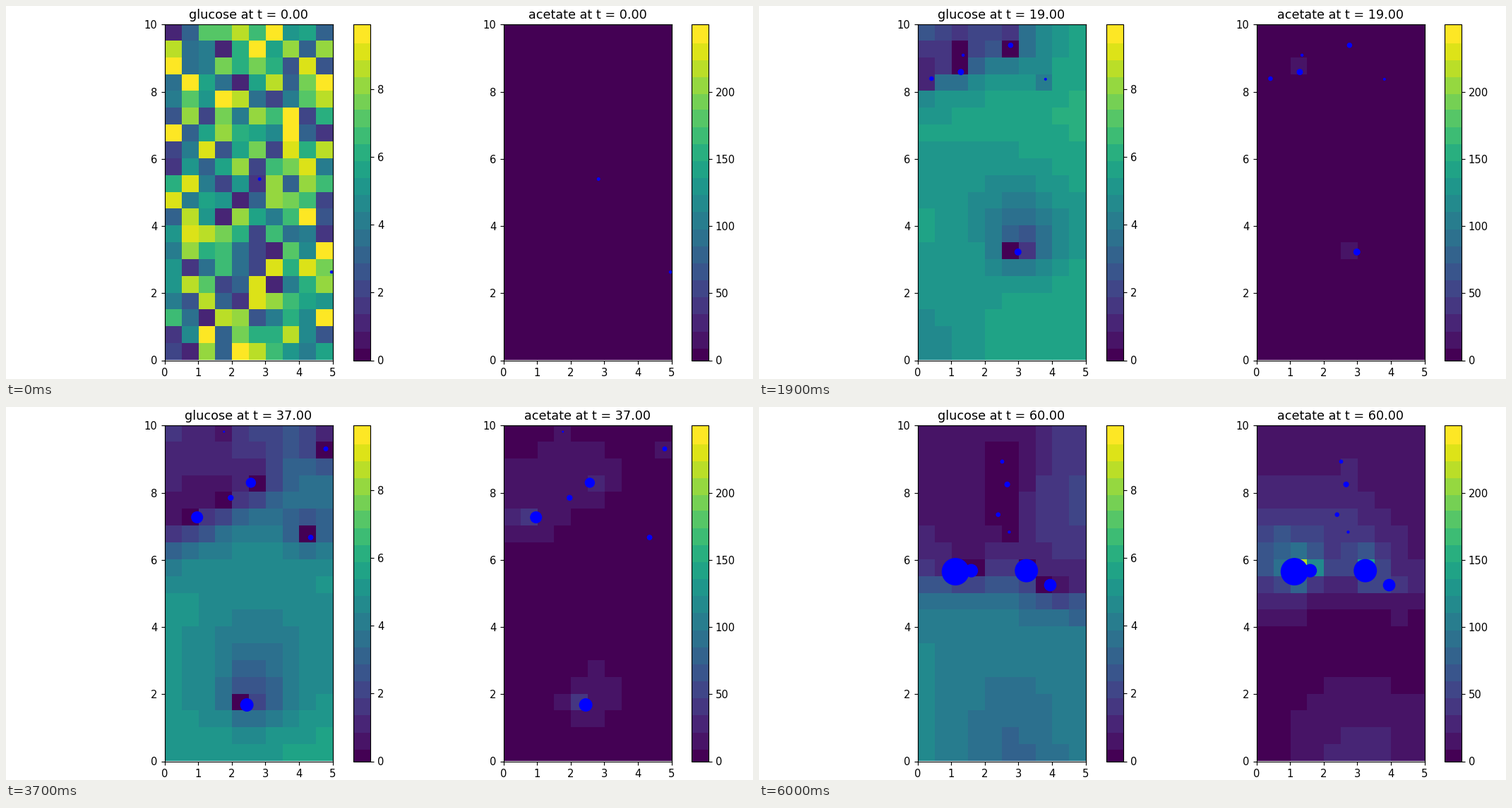
Write a matplotlib script that moves like this. It is 1058 by 529 pixels and loops after 6.1 s.

```python
import numpy as np
import matplotlib.pyplot as plt
from matplotlib.animation import FuncAnimation
from matplotlib.colors import ListedColormap

WIDTH, HEIGHT, DPI = 1058, 529, 105.8
FRAMES, INTERVAL = 61, 100
ROWS, COLS, CELL = 20, 10, 0.5
DIFFUSION, SUBSTEPS = 0.2, 2
UPTAKE, SECRETION = 0.27, 0.3
GROWTH, BIRTH_RADIUS = 0.036, 1.15
WAYPOINT_TIMES = np.array([0, 14, 25, 37, 45, 53, 60])

# Each bacterium: size factor, index of its first waypoint time, x's, y's
BACTERIA = [
    (2.5, 0, [2.83, 3.08, 2.88, 2.45, 2.95], [5.4, 3.7, 2.66, 1.68, 0.57]),
    (2.3, 0, [4.97, 5.1], [2.63, 1.5]),
    (1.1, 1, [1.38, 1.33, 1.97, 1.87, 1.43, 1.6], [9.6, 8.48, 7.85, 7.1, 6.3, 5.68]),
    (1.65, 1, [0.49, 0.33, -0.1], [9.07, 7.58, 6.6]),
    (2.25, 1, [1.45, 1.1, 0.97, 0.72, 0.86, 1.13], [9.13, 7.94, 7.27, 6.63, 6.08, 5.65]),
    (1.9, 1, [2.73, 2.82, 2.57, 2.56, 3.07, 3.24], [9.75, 8.95, 8.3, 7.27, 6.42, 5.68]),
    (1.02, 1, [3.75, 3.88, 4.35, 4.2, 4.63, 3.95], [8.88, 7.77, 6.67, 6.13, 5.45, 5.25]),
    (0.92, 3, [4.8, 5.15], [9.31, 8.7]),
    (0.38, 3, [1.77, 1.93, 2.73, 2.4], [9.82, 9.28, 8.26, 7.35]),
    (0.25, 4, [1.85, 2.03, 2.73], [8.48, 7.55, 6.83]),
    (0.47, 5, [2.73, 2.67], [9.19, 8.25]),
    (0.335, 5, [2.5, 2.52], [9.98, 8.93]),
]


def initial_glucose():
    rng = np.random.default_rng(4)
    levels = np.tile(np.linspace(1.3, 9.4, COLS), (ROWS, 1))
    field = rng.permuted(levels, axis=1) + rng.uniform(-0.4, 0.4, (ROWS, COLS))
    field[12:, 5:] += 0.9
    return np.clip(field, 1, 9.9)


def along(time, times, values):
    """Interpolate linearly, continuing the first and last segments outwards."""
    i = np.clip(np.searchsorted(times, time) - 1, 0, len(times) - 2)
    part = (time - times[i]) / (times[i + 1] - times[i])
    return values[i] + part * (values[i + 1] - values[i])


def bacteria_at(time):
    """Return x, y and pixel radius of every bacterium inside the box."""
    present = []
    for size, first, xs, ys in BACTERIA:
        times = WAYPOINT_TIMES[first:first + len(xs)]
        x, y = along(time, times, xs), along(time, times, ys)
        radius = size * np.exp(GROWTH * time)
        if 0 <= x <= 5 and 0 <= y <= 10 and radius > BIRTH_RADIUS:
            present.append((x, y, radius))
    return np.array(present)


def diffuse(field):
    p = np.pad(field, 1, mode="edge")
    around = p[2:, 1:-1] + p[:-2, 1:-1] + p[1:-1, 2:] + p[1:-1, :-2]
    return field + DIFFUSION / SUBSTEPS * (around - 4 * field)


def simulate():
    glucose, acetate = initial_glucose(), np.zeros((ROWS, COLS))
    history = [(glucose, acetate)]
    for time in range(1, FRAMES):
        for _ in range(SUBSTEPS):
            glucose, acetate = diffuse(glucose), diffuse(acetate)
            for x, y, radius in bacteria_at(time):
                site = min(int(y / CELL), ROWS - 1), min(int(x / CELL), COLS - 1)
                mass = radius ** 2 / SUBSTEPS
                glucose[site] = max(glucose[site] - UPTAKE * mass, 0)
                acetate[site] += SECRETION * mass
        history.append((glucose, acetate))
    return history


def banded_viridis(bands=20):
    level = np.round((np.linspace(0, 1, 256) - 0.0086) / 0.0508)
    level = np.clip(level, 0, bands - 1)
    return ListedColormap(plt.get_cmap("viridis")(level / (bands - 1)))


def pixel_axes(left, width):
    return fig.add_axes([left / WIDTH, 26.5 / HEIGHT, width / WIDTH, 476 / HEIGHT])


def make_panel(left, bar_left, vmax, ticks):
    ax = pixel_axes(left, 238)
    image = ax.imshow(np.zeros((ROWS, COLS)), cmap=cmap, vmin=0, vmax=vmax,
                      origin="lower", extent=(0, 5, 0, 10), aspect="auto",
                      interpolation="nearest")
    ax.set_xticks(range(6))
    ax.set_yticks(range(0, 11, 2))
    dots = ax.scatter([], [], color="blue", linewidths=0, zorder=2)
    ax.set(xlim=(0, 5), ylim=(0, 10))
    fig.colorbar(image, cax=pixel_axes(bar_left, 24), ticks=ticks)
    return ax, image, dots


plt.rcParams["font.family"] = "DejaVu Sans"
fig = plt.figure(figsize=(WIDTH / DPI, HEIGHT / DPI), dpi=DPI, facecolor="white")
cmap = banded_viridis()
panels = {
    "glucose": make_panel(224.5, 491.5, 9.91, range(0, 9, 2)),
    "acetate": make_panel(704.5, 970.5, 249.9, range(0, 201, 50)),
}
history = simulate()


def update(frame):
    x, y, radius = bacteria_at(frame).T
    for (name, (ax, image, dots)), field in zip(panels.items(), history[frame]):
        image.set_data(field)
        dots.set_offsets(np.column_stack([x, y]))
        dots.set_sizes((2 * radius * 72 / DPI) ** 2)
        ax.set_title(f"{name} at t = {frame:.2f}")
    return []


anim = FuncAnimation(fig, update, frames=FRAMES, interval=INTERVAL,
                     repeat=True, repeat_delay=0)
plt.show()
```
